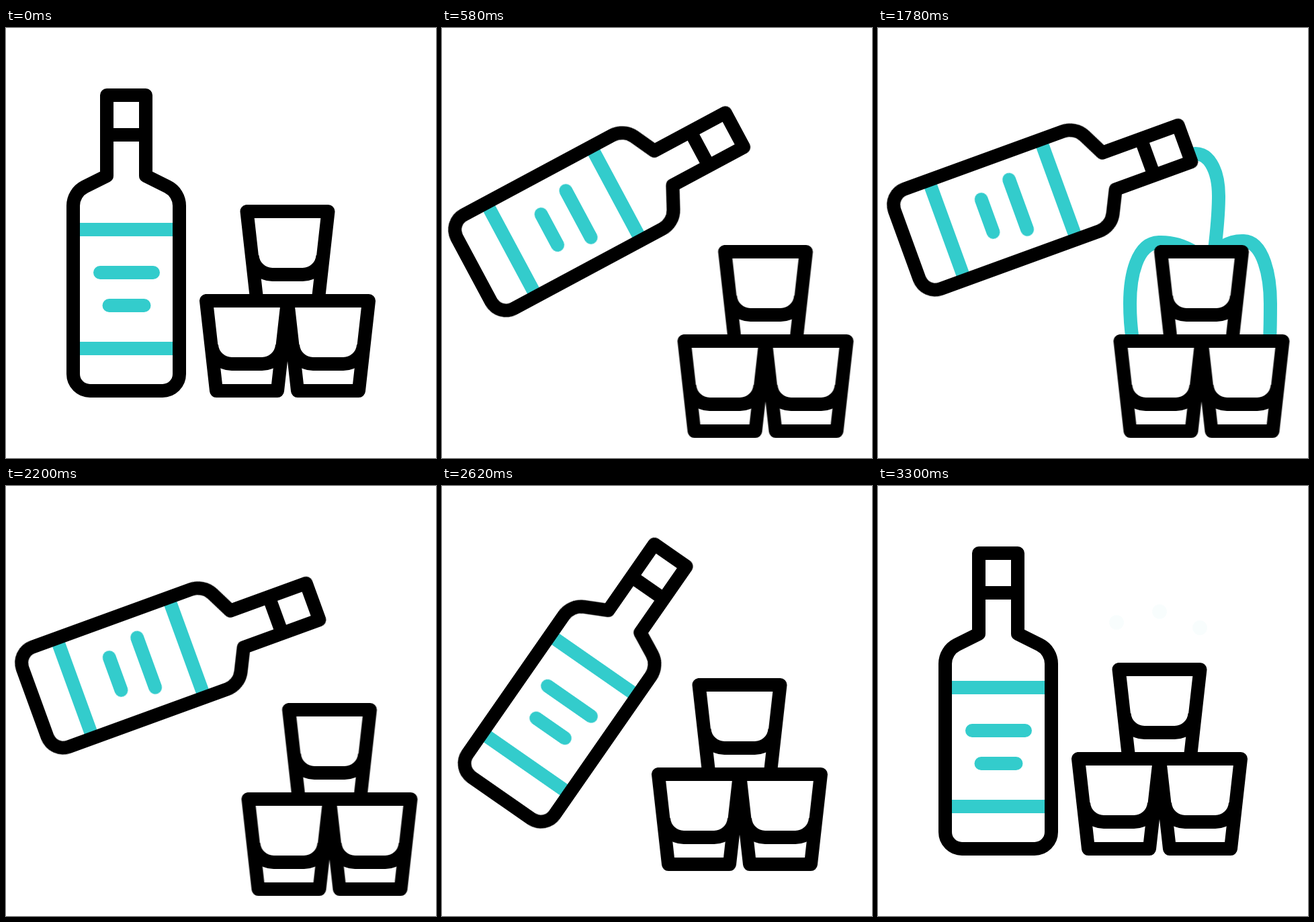
These frames come from a looping animation (640x640 px, 3.52 s). An HTML page:

```html
<!DOCTYPE html>
<html lang="en">
<head>
<meta charset="utf-8">
<title>Bottle and shots</title>
<style>
  html, body { margin: 0; width: 100%; height: 100%; overflow: hidden; background: #fff; }
  svg { display: block; width: 100vw; height: 100vh; }
  .ink { fill: #fff; stroke: #000; }
  .teal { fill: none; stroke: #3cc; }
  .ink, .teal { stroke-width: 20; stroke-linejoin: round; }
  .round { stroke-linecap: round; }
  .open { fill: none; }
  .stream { stroke-dasharray: 1 3; stroke-dashoffset: 1.02; }
  .drop { fill: #3cc; opacity: 0; }
  #bottle { transform-box: view-box; transform-origin: 179px 320px; }
</style>
</head>
<body>
<svg viewBox="0 0 640 640">
  <defs>
    <g id="glass">
      <path class="ink" d="M298 406H419L404 540H313Z"/>
      <path class="ink open" d="M306 472A30 30 0 0 0 336 500H381A30 30 0 0 0 411 472"/>
    </g>
  </defs>

  <path id="pour" class="teal stream" pathLength="1"
        d="M462 189C492 178 507 213 507 250C507 280 504 305 501 330"/>
  <path class="teal stream side" pathLength="1"
        d="M470 333Q445 318 418 319C385 320 375 370 375 410C375 430 376 445 379 465"/>
  <path class="teal stream side" pathLength="1"
        d="M500 334Q522 316 544 317C574 318 584 370 584 410C584 430 584 445 583 465"/>

  <circle class="drop" cx="355" cy="203" r="11"/>
  <circle class="drop" cx="419" cy="187" r="11"/>
  <circle class="drop" cx="479" cy="211" r="11"/>

  <g id="glasses">
    <use href="#glass" x="60.5" y="-133"/>
    <use href="#glass"/>
    <use href="#glass" x="121"/>
  </g>

  <g id="bottle">
    <path class="ink" d="M150 100H208V220L240.600 236.300A31.500 31.500 0 0 1 258 264.500V515A25 25 0 0 1 233 540H125A25 25 0 0 1 100 515V264.500A31.500 31.500 0 0 1 117.400 236.300L150 220Z"/>
    <path class="teal" d="M110 300H248M110 477H248"/>
    <path class="teal round" d="M140 364H219M153.500 413H205.500"/>
    <path class="ink open round" d="M150 159H208"/>
  </g>
</svg>
<script>
  const LOOP = 3520;
  const EASE = 'cubic-bezier(.333,0,.667,1)';
  const all = sel => document.querySelectorAll(sel);

  // steps: [ms, value, easing towards the next step]
  function play(el, prop, steps) {
    const first = steps[0], last = steps[steps.length - 1];
    const full = [[0, first[1]], ...steps, [LOOP, last[1]]];
    el.animate(
      full.map(([ms, value, easing = 'linear']) => ({ offset: ms / LOOP, [prop]: value, easing })),
      { duration: LOOP, iterations: Infinity }
    );
  }

  const rest = 'translate(0px,0px) rotate(0deg)';
  const tilt = 'translate(70.8px,-72.8px) rotate(70deg)';
  play(document.getElementById('bottle'), 'transform', [
    [203, rest, 'cubic-bezier(.46,0,.41,1)'], [744, tilt], [2320, tilt, EASE], [2920, rest]
  ]);

  const home = 'translate(0px,0px)';
  const under = 'translate(62.5px,60px)';
  play(document.getElementById('glasses'), 'transform', [
    [202, home, EASE], [581, under], [2320, under, EASE], [2840, home]
  ]);

  // A stream grows from its start, then drains towards its end.
  const flow = (el, on, full, off, dry) => play(el, 'strokeDashoffset', [
    [on, 1.02, EASE], [full, 0], [off, 0, EASE], [dry, -1.02]
  ]);
  flow(document.getElementById('pour'), 730, 1000, 1770, 2020);
  all('.side').forEach(el => flow(el, 1210, 1480, 2000, 2220));

  // Drops leap out of the top glass and fade.
  const starts = [[34, 84], [0, 100], [-30, 76]];
  all('.drop').forEach((el, i) => {
    const [x, y] = starts[i];
    play(el, 'transform', [
      [2860, `translate(${x}px,${y}px)`, 'cubic-bezier(.3,0,.5,1)'], [3300, 'translate(0px,0px)']
    ]);
    play(el, 'opacity', [[2859, 0], [2860, 1], [3100, 1], [3300, 0.03]]);
  });
</script>
</body>
</html>
```
